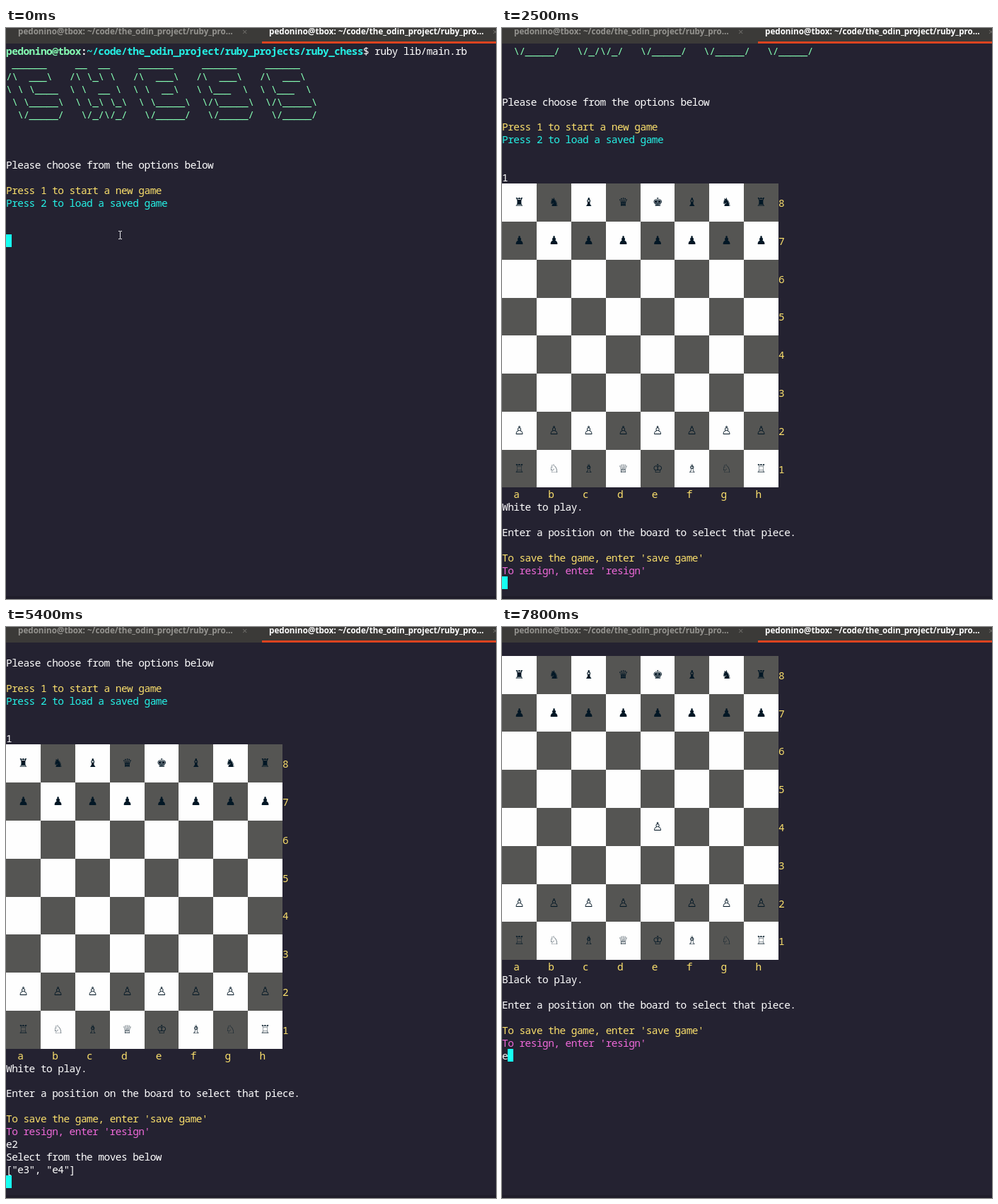
Animation of 693 by 808 pixels, one loop 8000 ms. Source, as an HTML page:

```html
<!DOCTYPE html>
<html lang="en">
<head>
<meta charset="utf-8">
<title>Terminal chess</title>
<style>
html, body { margin: 0; width: 100%; height: 100%; overflow: hidden; background: #242231; }
#stage { position: relative; width: 693px; height: 808px; overflow: hidden; background: #242231; }
#stage::after { content: ""; position: absolute; left: 0; right: 0; top: 804px; height: 4px; background: #1f1d2a; }
#bar { position: absolute; inset: 0 0 auto; height: 22px; overflow: hidden; background: #3b3a38;
  font: bold 11.67px/16px "Open Sans", sans-serif; white-space: nowrap; }
#bar span { position: absolute; top: -3px; color: #94938f; }
#bar .active { color: #fff; }
#bar .close { font-weight: normal; font-size: 13px; color: #6f6e6a; }
#bar i { position: absolute; left: 362px; right: 0; top: 19px; height: 3px; background: #dc4320; }
#screen * { position: absolute; margin: 0; }
pre { font: 14.5px/18px "Noto Sans Mono", monospace; letter-spacing: -.554px; color: #fff; }
#screen pre span { position: static; }
.bold { font-weight: bold; }
pre.green, .green { color: #86ffb4; }
pre.cyan, .cyan { color: #25f2e6; }
pre.yellow { color: #fbe06c; }
pre.pink { color: #ee69d8; }
.cursor { width: 8px; height: 18px; background: #17fff1; }
.square { background: #fefefe; color: #021725; text-align: center;
  font: 16.3px/54px "DejaVu Sans", sans-serif; }
.dark { background: #555553; }
#pointer { position: absolute; left: 158px; top: 286px; fill: none; stroke: #e8e8ec; }
</style>
</head>
<body>
<div id="stage">
  <div id="screen"></div>
  <svg id="pointer" width="8" height="14"><path d="M1 1.5h2l.5.5.5-.5h2M3.5 2v10M1 12.5h2l.5-.5.5.5h2"/></svg>
  <div id="bar">
    <span style="left:17px">pedonino@tbox: ~/code/the_odin_project/ruby_pro…</span>
    <span class="close" style="left:334px">×</span>
    <span class="active" style="left:372px">pedonino@tbox: ~/code/the_odin_project/ruby_pro…</span>
    <span class="close" style="left:688px">×</span>
    <i></i>
  </div>
</div>
<script>
const LOOP = 8000, COL = 8.146, ROW = 17.93, TOP = 22.9;
const screen = document.getElementById("screen");
const pointer = document.getElementById("pointer");

const x = col => Math.round(col * COL);
const y = row => Math.round(TOP + row * ROW);

const text = (row, str, cls = "", col = 0) => row < 0 ? "" :
  `<pre class="${cls}" style="left:${col * COL}px;top:${y(row)}px">${str}</pre>`;

const banner = String.raw`
 ______     __  __     ______     ______     ______
/\  ___\   /\ \_\ \   /\  ___\   /\  ___\   /\  ___\
\ \ \____  \ \  __ \  \ \  __\   \ \___  \  \ \___  \
 \ \_____\  \ \_\ \_\  \ \_____\  \/\_____\  \/\_____\
  \/_____/   \/_/\/_/   \/_____/   \/_____/   \/_____/`.split("\n").slice(1);

const prompt = '<span class="bold"><span class="green">pedonino@tbox</span>:' +
  '<span class="cyan">~/code/the_odin_project/ruby_projects/ruby_chess</span></span>$ ruby lib/main.rb';

const menu = top =>
  text(top, prompt) +
  banner.map((line, i) => text(top + 1 + i, line, "green")).join("") +
  text(top + 9, "Please choose from the options below") +
  text(top + 11, "Press 1 to start a new game", "yellow") +
  text(top + 12, "Press 2 to load a saved game", "cyan");

const opening = ["♜♞♝♛♚♝♞♜", "♟♟♟♟♟♟♟♟", "", "", "", "", "♙♙♙♙♙♙♙♙", "♖♘♗♕♔♗♘♖"];
const afterMove = opening.with(4, "    ♙").with(6, "♙♙♙♙ ♙♙♙");

function board(top, ranks) {
  let html = "";
  ranks.forEach((rank, r) => {
    const row = top + r * 3;
    for (let file = 0; file < 8; file++) {
      const left = x(file * 6), up = y(row);
      html += `<div class="square ${(r + file) % 2 ? "dark" : ""}" style="left:${left}px;top:${up}px;` +
        `width:${x(file * 6 + 6) - left}px;height:${y(row + 3) - up}px">${(rank[file] || "").trim()}` +
        `${rank[file] > " " ? "\uFE0E" : ""}</div>`;
    }
    html += text(row + 1, 8 - r, "yellow", 48);
  });
  return html;
}

const turn = (top, player, ranks) =>
  board(top, ranks) +
  [..."abcdefgh"].map((file, i) => text(top + 24, file, "yellow", 2 + i * 6)).join("") +
  text(top + 25, `${player} to play.`) +
  text(top + 27, "Enter a position on the board to select that piece.") +
  text(top + 29, "To save the game, enter 'save game'", "yellow") +
  text(top + 30, "To resign, enter 'resign'", "pink");

const firstTurn = scroll => menu(-scroll) + text(15 - scroll, "1") + turn(16 - scroll, "White", opening);

// Each view has its content and the row of its input line.
const views = {
  start: [menu(0), 15],
  select: [firstTurn(5), 42],
  move: [firstTurn(8) + text(39, "e2") + text(40, "Select from the moves below") +
    text(41, '["e3", "e4"]'), 42],
  drawing: [board(1, afterMove.slice(0, 4)), 13],
  reply: [turn(1, "Black", afterMove), 32],
};

// Start time, view, typed input, cursor shown
const steps = [
  [0, "start", "", true], [100, "start", "", false], [700, "start", "", true],
  [1300, "start", "", false], [1800, "start", "", true], [2000, "start", "1", true],
  [2400, "start", "1", false],
  [2500, "select", "", true], [3100, "select", "", false], [3700, "select", "", true],
  [4300, "select", "", false], [4800, "select", "", true], [5000, "select", "e", true],
  [5100, "select", "e2", true],
  [5400, "move", "", true], [5700, "move", "e", true], [6100, "move", "e4", true],
  [6500, "drawing", "", true],
  [7000, "reply", "", true], [7500, "reply", "", false], [7700, "reply", "", true],
  [7800, "reply", "e", true],
];

let shown;
function render() {
  const time = performance.now() % LOOP;
  const step = steps.findLast(([start]) => start <= time);
  if (step !== shown) {
    shown = step;
    const [start, view, typed, cursor] = step;
    const [content, row] = views[view];
    screen.innerHTML = content + text(row, typed) +
      (cursor ? `<div class="cursor" style="left:${x(typed.length)}px;top:${y(row)}px"></div>` : "");
    pointer.style.display = start < 1800 ? "" : "none";
  }
  requestAnimationFrame(render);
}
render();
</script>
</body>
</html>
```
